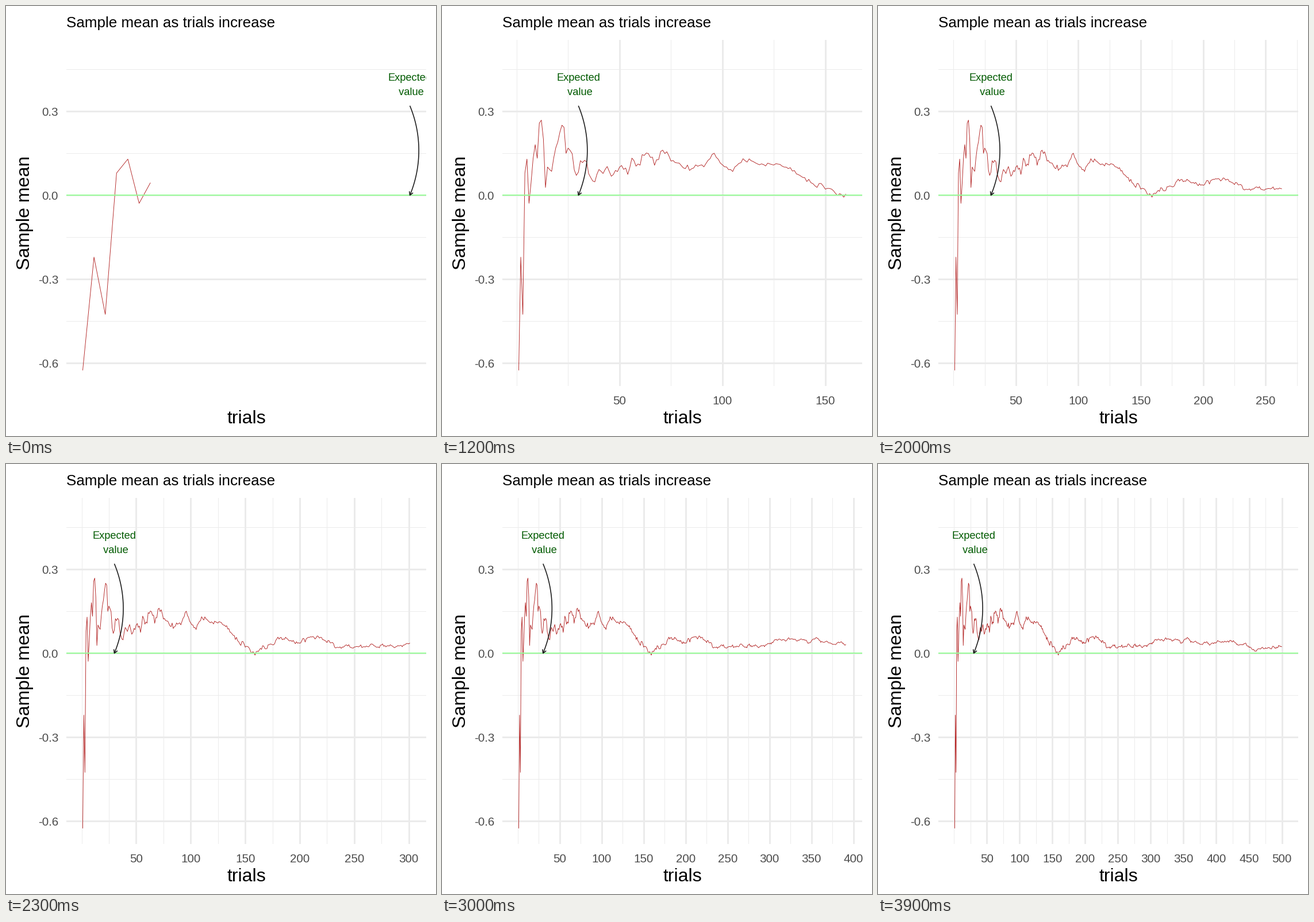
These frames come from a looping animation (748x748 px, 5 s). A matplotlib script:

```python
import math
import random

import matplotlib.pyplot as plt
import numpy as np
from matplotlib.animation import FuncAnimation

SIZE, DPI = 748, 100
PX = 72 / DPI                      # points per pixel
LEFT, TOP, WIDTH, HEIGHT = 105, 58.6, 626, 602.6
TRIALS, MOVING, FRAMES = 500, 40, 50
LABEL_X = 30
GREY, GRID = "#4D4D4D", "#EBEBEB"

plt.rcParams["font.family"] = "Liberation Sans"
plt.rcParams["path.simplify"] = False


def seeded_twister(seed):
    """Mersenne Twister whose state is filled by a linear congruential rule."""
    def step(value):
        return (69069 * value + 1) % 2**32

    for _ in range(51):
        seed = step(seed)
    state = []
    for _ in range(624):
        seed = step(seed)
        state.append(seed)
    rng = random.Random(1)
    rng.setstate((3, tuple(state) + (624,), None))
    return rng


def normal_quantile(p):
    low, high = -8.0, 8.0
    for _ in range(48):
        mid = (low + high) / 2
        if math.erfc(-mid / math.sqrt(2)) / 2 < p:
            low = mid
        else:
            high = mid
    return (low + high) / 2


def normal_sample(rng):
    def uniform():
        return rng.getrandbits(32) / (2**32 - 1)

    big = 2**27
    return normal_quantile((int(big * uniform()) + uniform()) / big)


rng = seeded_twister(1)
trial = np.arange(1, TRIALS + 1)
mean = np.cumsum([normal_sample(rng) for _ in trial]) / trial

fig = plt.figure(figsize=(SIZE / DPI, SIZE / DPI), dpi=DPI, facecolor="white")
ax = fig.add_axes([LEFT / SIZE, 1 - (TOP + HEIGHT) / SIZE,
                   WIDTH / SIZE, HEIGHT / SIZE])
ax.set_frame_on(False)
ax.set_axisbelow(True)
ax.tick_params(which="both", length=0, labelleft=False, labelbottom=False)

x_breaks = np.arange(50, 501, 50)
ax.set_xticks(x_breaks)
ax.set_yticks([-0.6, -0.3, 0, 0.3])
ax.set_yticks([-0.45, -0.15, 0.15, 0.45], minor=True)
ax.grid(which="major", color=GRID, lw=3 * PX, antialiased=False)
ax.grid(which="minor", color=GRID, lw=1 * PX, antialiased=False)

y_low, y_high = mean.min(), 0.5
pad = 0.05 * (y_high - y_low)
ax.set_ylim(y_low - pad, y_high + pad)
y_per_px = 1.1 * (y_high - y_low) / HEIGHT


def page_text(x, y, text, size, **style):
    return fig.text(x / SIZE, 1 - y / SIZE, text, fontsize=size * PX,
                    va="baseline", **style)


def panel_line(color, width, zorder):
    return ax.plot([], [], color=color, lw=width * PX,
                   solid_capstyle="butt", zorder=zorder)[0]


def y_pixel(value):
    return TOP + (y_high + pad - value) / y_per_px


page_text(105, 36.5, "Sample mean as trials increase", 26)
page_text(418, 726, "trials", 32.2, ha="center")
page_text(41, 359.7, "Sample mean", 32.2, ha="center", rotation=90,
          rotation_mode="anchor")
for value in (-0.6, -0.3, 0.0, 0.3):
    page_text(91, y_pixel(value) + 8, f"{value:.1f}", 20.7,
              ha="right", color=GREY)

x_labels = [ax.text(b, 1 - (693.2 - TOP) / HEIGHT, str(b), ha="center",
                    va="baseline", fontsize=20.7 * PX, color=GREY,
                    transform=ax.get_xaxis_transform())
            for b in x_breaks]
for baseline, word in ((130, "Expected"), (155, " value")):
    ax.text(LABEL_X, 1 - (baseline - TOP) / HEIGHT, word, ha="center",
            va="baseline", fontsize=18.3 * PX, color="#005A00", clip_on=True,
            transform=ax.get_xaxis_transform(), zorder=4)

path = panel_line("firebrick", 0.9, 2)
ax.axhline(0, color="palegreen", lw=2 * PX, zorder=3)
curve = panel_line("#1A1A1A", 1.6, 5)
head = panel_line("#1A1A1A", 1.6, 5)

# Circular arc from 0.32 down to 0, bulging to the right by a tenth of its chord
half = 0.16 / y_per_px
bulge = 0.2 * half
radius = (half**2 + bulge**2) / (2 * bulge)
sweep = math.asin(half / radius)
angle = np.linspace(sweep, -sweep, 40)
curve_dx = radius * np.cos(angle) - radius + bulge
curve_y = 0.16 + radius * np.sin(angle) * y_per_px

barbs = np.array([sweep - math.pi / 6, sweep + math.pi / 6])
barb_x, barb_y = 6.9 * np.sin(barbs), 6.9 * np.cos(barbs)
head_dx = np.array([barb_x[0], 0, barb_x[1]])
head_y = np.array([barb_y[0], 0, barb_y[1]]) * y_per_px


def update(frame):
    step = (TRIALS - 1) / (MOVING - 1)
    count = min(TRIALS, int(1 + step * (frame + 0.5)))
    span = max(count, LABEL_X) - 1
    right = 1 + 1.05 * span
    # Thin lines need two visible breaks; setting ticks widens the view,
    # so the limits come last
    ax.set_xticks(np.arange(0, 526, 25) if right >= 100 else [], minor=True)
    ax.set_xlim(1 - 0.05 * span, right)
    for label, value in zip(x_labels, x_breaks):
        label.set_visible(value <= right)

    path.set_data(trial[:count], mean[:count])
    x_per_px = 1.1 * span / WIDTH
    curve.set_data(LABEL_X + curve_dx * x_per_px, curve_y)
    head.set_data(LABEL_X + head_dx * x_per_px, head_y)
    return []


anim = FuncAnimation(fig, update, frames=FRAMES, interval=100,
                     init_func=lambda: update(0), repeat=True, repeat_delay=0)
plt.show()
```
